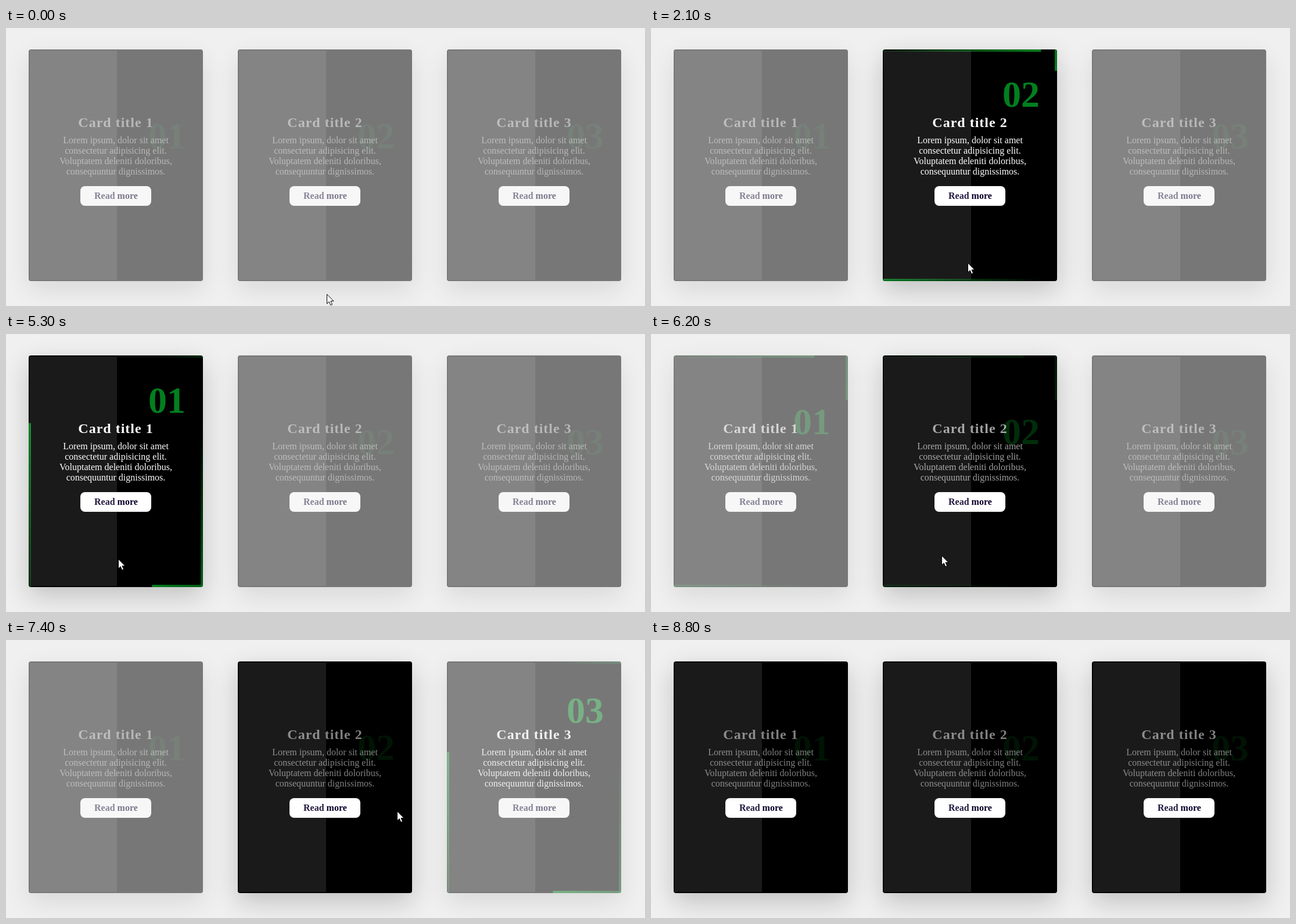
An HTML page for the animation above (8900 ms loop, 1100 by 480 pixels).

```html
<!DOCTYPE html>
<html lang="en">
<head>
<meta charset="utf-8">
<title>Card hover</title>
<style>
  html, body { margin: 0; width: 100%; height: 100%; overflow: hidden; background: #f0f0f0; }
  body { position: relative; font: 16px/18px "Liberation Serif", serif; }
  .card {
    position: absolute; top: 37px; width: 300px; height: 400px; overflow: hidden;
    border-radius: 4px; background: #000; color: #fff; text-align: center;
    box-shadow: 0 15px 45px rgba(0, 0, 0, .2);
  }
  .card > * { position: absolute; margin: 0; white-space: nowrap; }
  .num { right: 30px; top: 42px; font: bold 64px/71px "Liberation Serif", serif; color: #027f1f; }
  h2 { left: 0; width: 100%; top: 113px; font-size: 24px; line-height: 27px; letter-spacing: 1px; }
  p { left: 0; width: 100%; top: 148px; }
  .row { left: 0; width: 100%; top: 236px; }
  .btn {
    display: inline-block; padding: 8px 23.6px 8px 24.4px; border-radius: 8px;
    background: #fff; color: #0c002b; font-weight: bold;
  }
  .bar { --g: transparent, #027f1f; }
  .h { left: 0; width: 100%; height: 4px; }
  .v { top: 0; height: 100%; width: 4px; }
  .t { top: 0; background: linear-gradient(to right, var(--g)); }
  .r { right: 0; background: linear-gradient(to bottom, var(--g)); }
  .b { bottom: 0; background: linear-gradient(to left, var(--g)); }
  .l { left: 0; background: linear-gradient(to top, var(--g)); }
  .panel { left: 2px; top: 2px; bottom: 2px; width: 50%; background: rgba(255, 255, 255, .1); }
  #cursor { position: absolute; left: 0; top: 0; overflow: visible; }
</style>
</head>
<body>
<svg id="cursor" width="14" height="21">
  <path d="M.5 .8V17L4.2 13.5L6.8 19.6L9.6 18.4L7 12.5H12Z" fill="#fff" stroke="#000"/>
</svg>
<script>
const LOOP = 8900, STEP = 100, ENTER = 1100, LEAVE = 8300, FADE = 500, TURN = 2000;
const LEFT = 39, TOP = 37, WIDTH = 300, HEIGHT = 400, PITCH = 360;

// pointer stops: time, x, y
const STOPS = [
  [ENTER, 550, 475], [1400, 545, 405], [4200, 543, 404], [4800, 193, 388], [5900, 193, 388],
  [6200, 500, 382], [6600, 580, 380], [6800, 822, 377], [7300, 840, 330],
  [7600, 339, 225], [7900, 118, 166], [LEAVE, 39, 60]
];

function pointer(t) {
  if (t < STEP) return [552, 459];
  if (t < ENTER || t >= LEAVE) return null;
  const i = STOPS.findIndex(s => s[0] > t);
  const [t0, x0, y0] = STOPS[i - 1], [t1, x1, y1] = STOPS[i];
  const f = (t - t0) / (t1 - t0);
  return [x0 + (x1 - x0) * f, y0 + (y1 - y0) * f];
}

function cardAt(t) {
  const p = pointer(t);
  if (!p || p[1] < TOP || p[1] >= TOP + HEIGHT) return -1;
  const x = p[0] - LEFT;
  return x >= 0 && x % PITCH < WIDTH ? Math.floor(x / PITCH) : -1;
}

// every stay of the pointer on a card
const visits = [];
for (let t = 0, last = -1; t <= LEAVE; t += 10) {
  const card = cardAt(t);
  if (card !== last && last >= 0) visits.at(-1).end = t;
  if (card !== last && card >= 0) visits.push({ card, start: t });
  last = card;
}

// CSS "ease": cubic-bezier(.25, .1, .25, 1)
function ease(x) {
  if (x <= 0) return 0;
  if (x >= 1) return 1;
  const curve = (s, p, q) => 3 * s * (1 - s) * ((1 - s) * p + s * q) + s ** 3;
  let lo = 0, hi = 1;
  for (let i = 0; i < 24; i++) {
    const mid = (lo + hi) / 2;
    if (curve(mid, .25, .25) < x) lo = mid; else hi = mid;
  }
  return curve(lo, .1, 1);
}

// a cut-off rise falls back in proportionally less time
function rise(t, { start, end }) {
  const peak = ease((Math.min(t, end) - start) / FADE);
  return t <= end ? peak : peak * (1 - ease((t - end) / (FADE * peak)));
}

const sweep = turn => 200 * (turn % 1) - 100;

const cursor = document.getElementById("cursor");
const cards = [0, 1, 2].map(i => {
  const el = document.createElement("div");
  el.className = "card";
  el.style.left = LEFT + PITCH * i + "px";
  el.innerHTML = `
    <i class="bar h t"></i><i class="bar v r"></i><i class="bar h b"></i><i class="bar v l"></i>
    <div class="num">0${i + 1}</div>
    <h2>Card title ${i + 1}</h2>
    <p>Lorem ipsum, dolor sit amet<br>consectetur adipisicing elit.<br>Voluptatem deleniti doloribus,<br>consequuntur dignissimos.</p>
    <div class="row"><span class="btn">Read more</span></div>
    <div class="panel"></div>`;
  cursor.before(el);
  const all = s => [...el.querySelectorAll(s)];
  return { el, num: all(".num")[0], text: all("h2, p"), bars: all(".bar") };
});

function draw(t) {
  const turn = t / TURN + .496, hovered = cardAt(t);
  const x = -sweep(turn), y = sweep(turn + .5);
  cards.forEach((card, i) => {
    const level = Math.max(0, ...visits.filter(v => v.card === i).map(v => rise(t, v)));
    card.el.style.opacity = hovered === i || t >= LEAVE ? 1 : .5;
    card.num.style.opacity = .15 + .85 * level;
    card.num.style.transform = `translateY(${72 * (1 - level)}px)`;
    for (const el of card.text) el.style.opacity = .5 + .5 * level;
    for (const bar of card.bars) {
      bar.style.opacity = level;
      bar.style.transform = bar.classList.contains("h") ? `translateX(${x}%)` : `translateY(${y}%)`;
    }
  });
  const p = pointer(t);
  cursor.style.visibility = p ? "visible" : "hidden";
  if (p) cursor.style.transform = `translate(${Math.round(p[0])}px, ${Math.round(p[1])}px)`;
}

const begin = performance.now();
function tick() {
  const t = (performance.now() - begin) % LOOP;
  draw(Math.floor(t / STEP) * STEP);
  requestAnimationFrame(tick);
}
tick();
</script>
</body>
</html>
```
